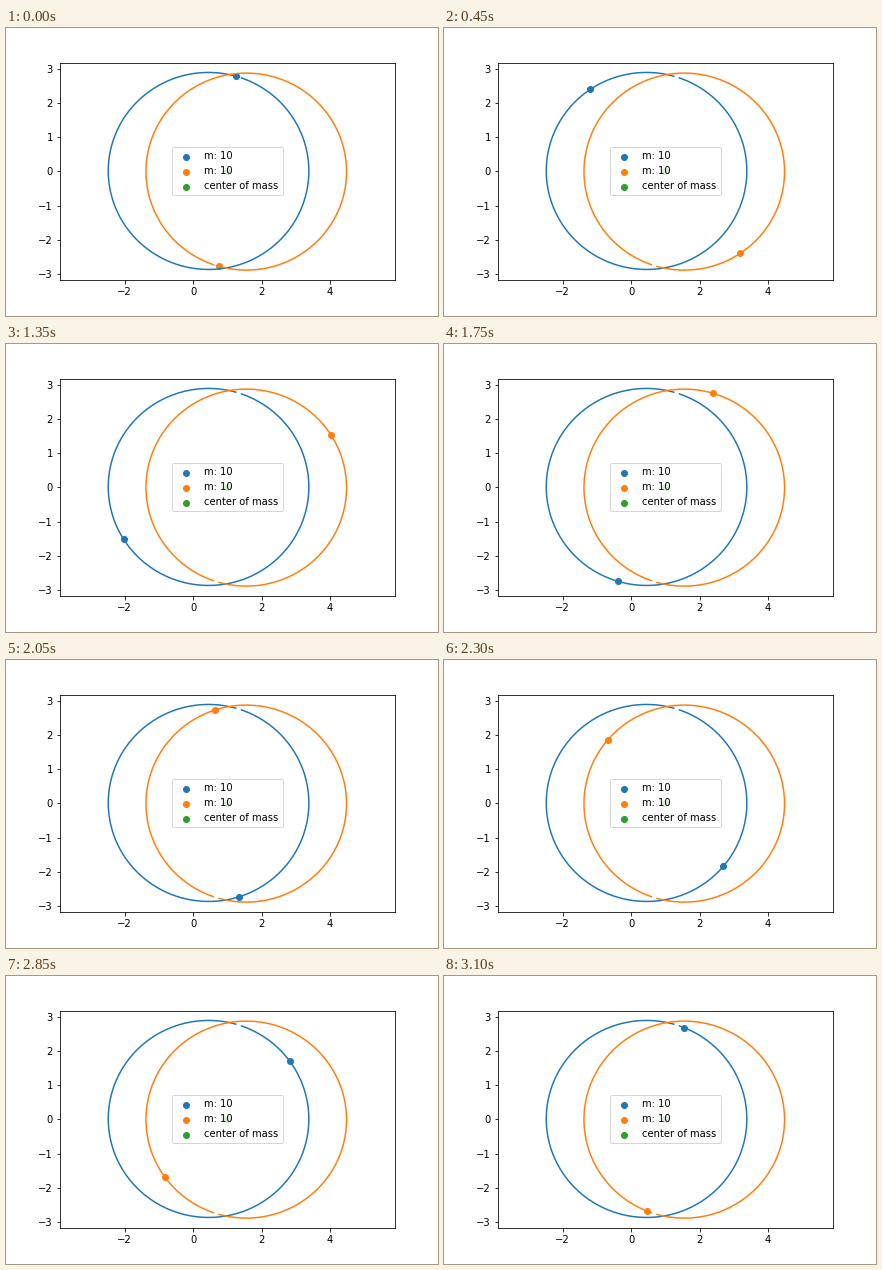
A matplotlib script that plays this animation: 432 px wide and 288 px high, repeating every 3150 ms.

```python
import numpy as np
import matplotlib.pyplot as plt
from matplotlib.animation import FuncAnimation

FRAMES, STRIDE, STEPS = 63, 16, 1000
A, ECC = 2.93, 0.188               # semi-major axis, eccentricity
TILT = np.radians(-1)              # direction of periapsis
PHASE = np.radians(64.8)           # mean anomaly at the start
RATE = 2 * np.pi / (FRAMES * STRIDE)
CENTER = np.array([1.0, 0.0])


def orbit(steps):
    """Offset of the first body from the center of mass, by Kepler's equation."""
    mean = PHASE + RATE * steps
    ecc_anom = mean.copy()
    for _ in range(40):
        ecc_anom = mean + ECC * np.sin(ecc_anom)
    x = A * (np.cos(ecc_anom) - ECC)
    y = A * np.sqrt(1 - ECC**2) * np.sin(ecc_anom)
    c, s = np.cos(TILT), np.sin(TILT)
    return np.column_stack([c * x - s * y, s * x + c * y])


offset = orbit(np.arange(STEPS, dtype=float))
paths = [CENTER + offset, CENTER - offset]

fig, ax = plt.subplots(figsize=(6, 4), dpi=72)
fig.subplots_adjust(left=0.125, right=0.9, bottom=0.125, top=0.88)

for path in paths:
    ax.plot(*path.T)
dots = [ax.scatter(*path[0], color=f"C{i}", label="m: 10")
        for i, path in enumerate(paths)]
ax.scatter(*CENTER, color="C2", label="center of mass")
ax.axis("equal")
ax.legend(loc="center")


def update(frame):
    for dot, path in zip(dots, paths):
        dot.set_offsets(path[frame * STRIDE])
    return dots


anim = FuncAnimation(fig, update, frames=FRAMES, interval=50,
                     repeat=True, repeat_delay=0)
plt.show()
```
